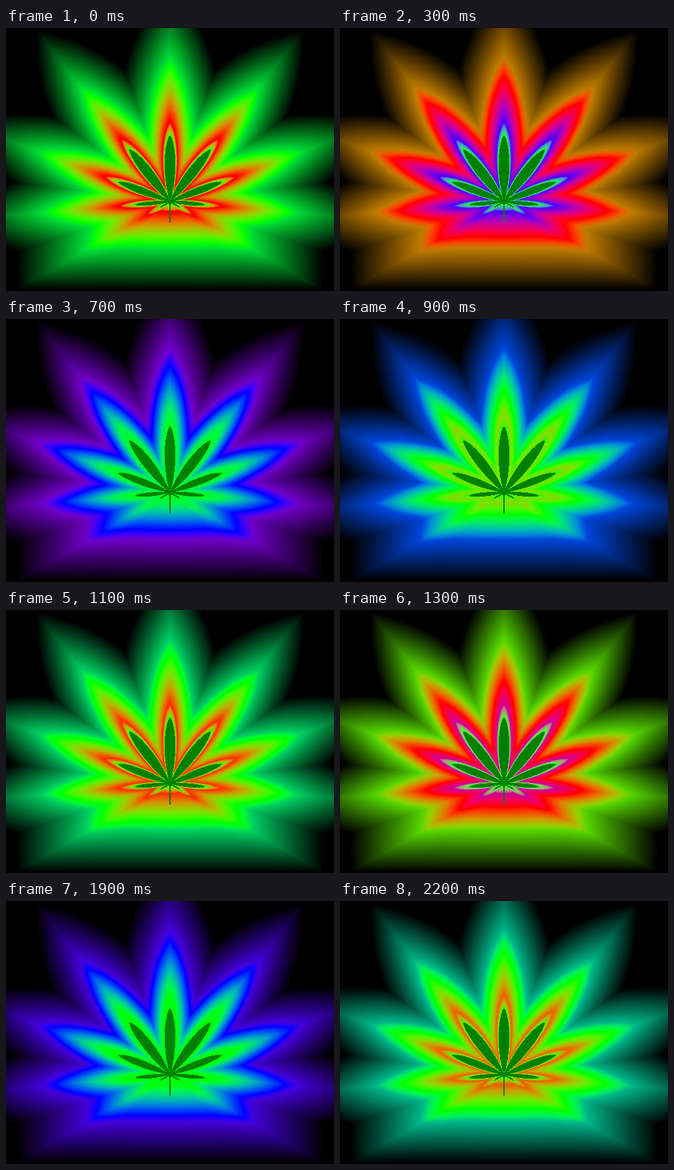
Write an HTML page with a canvas that moves like this. It is 500x400 px and loops after 2.3 s.

```html
<!DOCTYPE html>
<html>
<head>
<meta charset="utf-8">
<style>
html, body { margin: 0; width: 500px; height: 400px; overflow: hidden; background: #000; }
canvas { display: block; }
</style>
</head>
<body>
<canvas id="stage" width="500" height="400"></canvas>
<script>
const W = 500, H = 400, CX = 250, CY = 264, FLOOR = 398;
const STEPS = 23, STEP_MS = 100, LEVELS = 1024;
const ctx = document.getElementById('stage').getContext('2d');
const image = ctx.createImageData(W, H);
const pixels = new Uint32Array(image.data.buffer);

// Leaflets from the top down one side: angle, leaf length, glow length
const tips = [[0, 101, 330], [38, 101, 330], [69.3, 85, 335], [95, 54, 328], [120, 18, 268]];
// Notches between leaflets: angle, glow length
const notches = [[19, 212], [54, 222], [83, 243], [108, 245]];
const CORE = 4;

const clamp = v => Math.max(0, Math.min(1, v));
const rgb = (r, g, b) => (255 << 24 | b << 16 | g << 8 | r) >>> 0;
const LEAF = rgb(0, 128, 0);

const leafShape = u => (1 - u) ** 1.5 * (1 + 1.1 * u * (1 - u));

// Radii of the leaf edge and of the outer end of the glow
function radii(angle) {
  if (angle > 120) {
    const u = clamp((angle - 120) / 14);
    const down = Math.cos((180 - angle) * Math.PI / 180);
    return [CORE + 14 * leafShape(u), (FLOOR - CY) / down];
  }
  let i = 0;
  while (i < 4 && angle > notches[i][0]) i++;
  const [mid, leaf, glow] = tips[i];
  const [edge, low] = notches[angle < mid ? i - 1 : Math.min(i, 3)];
  const u = clamp((angle - mid) / (edge - mid));
  return [CORE + (leaf - CORE) * leafShape(u), low + (glow - low) * (1 - u)];
}

// 0 at the leaf edge, LEVELS where the glow ends, -1 inside the leaf
const field = new Int16Array(W * H);
for (let y = 0; y < H; y++) {
  for (let x = 0; x < W; x++) {
    const dx = x + 0.5 - CX, dy = CY - y - 0.5;
    const angle = Math.abs(Math.atan2(dx, dy)) * 180 / Math.PI;
    const [inner, outer] = radii(angle);
    const t = (Math.hypot(dx, dy) - inner) / (outer - inner);
    const stem = x >= 249 && x <= 250 && y >= CY && y < 296;
    field[y * W + x] = t < 0 || stem ? -1 : Math.min(LEVELS, t * LEVELS);
  }
}

// Colour wheel red, blue, green with a period of 3; channels as squares
function wheel(p) {
  p = (p % 3 + 3) % 3;
  const from = [0, 2, 1][Math.floor(p)], to = [2, 1, 0][Math.floor(p)];
  const c = [0, 0, 0];
  c[to] = Math.sin(p % 1 * Math.PI / 2) ** 2;
  c[from] = 1 - c[to];
  return c;
}

function glowColor(t, phase) {
  const shift = 1.15 * clamp((0.52 - t) / 0.42);
  const rim = clamp(1 - t / 0.08);
  const light = 255 * clamp((1 - t) / 0.54);
  const c = wheel(phase + shift).map((v, i) =>
    Math.round(light * Math.sqrt(v * (1 - rim) + (i === 1 ? rim : 0))));
  return rgb(...c);
}

const palette = new Uint32Array(LEVELS + 1);
let shown = -1;

function draw(now) {
  const step = Math.floor(now / STEP_MS) % STEPS;
  if (step !== shown) {
    shown = step;
    const phase = -1.15 + 6 * step / STEPS;
    for (let i = 0; i <= LEVELS; i++) palette[i] = glowColor(i / LEVELS, phase);
    for (let i = 0; i < pixels.length; i++) pixels[i] = field[i] < 0 ? LEAF : palette[field[i]];
    ctx.putImageData(image, 0, 0);
  }
}

const start = performance.now();
function loop() {
  draw(performance.now() - start);
  requestAnimationFrame(loop);
}
loop();
</script>
</body>
</html>
```
